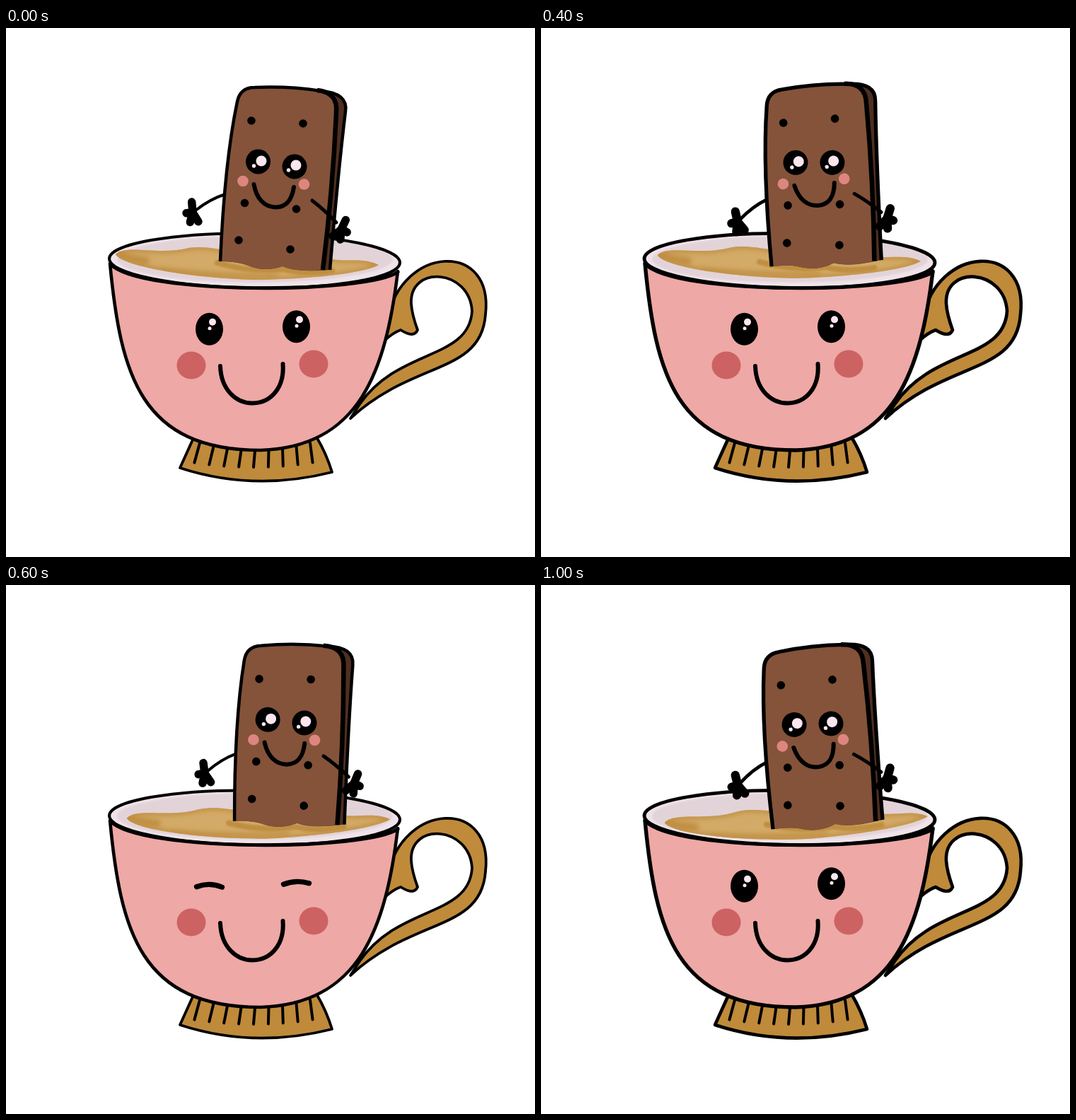
Write an HTML page with a canvas that moves like this. It is 748 px wide and 748 px high and loops after 1200 ms.

```html
<!DOCTYPE html>
<html lang="en">
<head>
<meta charset="utf-8">
<title>Biscuit in a teacup</title>
<style>
  html, body { margin: 0; width: 100%; height: 100%; overflow: hidden; background: #fff; }
  canvas { display: block; width: 748px; height: 748px; }
</style>
</head>
<body>
<canvas id="stage" width="748" height="748"></canvas>
<script>
const ctx = document.getElementById('stage').getContext('2d');
const INK = '#000', GOLD = '#bf8a3a', SHINE = '#fbe6ee', COFFEE = '#d3aa67', BREW = '#bf8e42';
const STEP = 200, RAD = Math.PI / 180;

const body = new Path2D('M147 333C162 490 190 597 360 597C500 593 537 485 554 344');
const handle = new Path2D(
  'M540 410C560 308 690 300 678 405C672 490 575 470 487 552' +
  'L500 532C555 452 655 470 659 400C655 340 570 335 573 390' +
  'Q574 405 582 427Q577 439 558 427Q547 431 535 442Z');
const foot = new Path2D('M265 580L246 622Q350 656 461 628Q453 602 440 580Z');
const rim = new Path2D();
rim.ellipse(351.5, 329, 205.5, 38.5, 0.8 * RAD, 0, 2 * Math.PI);
const liquid = new Path2D(
  'M155 320C170 305 215 322 258 311C300 305 320 326 440 322' +
  'C480 335 500 322 527 335C500 350 400 356 350 356C270 354 165 338 155 320Z');

const LEFT = 'M303 330Q309 190 327 104Q331 84 352 84Q400 82 ';
const OUTER = LEFT + '445 89Q484 92 480 118Q470 200 458 342';
const RIDGE = '440 88Q470 91 467 120Q462 230 448 342';
const WAVE = 'Q412 346 391 337Q365 346 340 335Q325 330 303 330Z';
const slab = new Path2D(OUTER + WAVE);
const slabFront = new Path2D(LEFT + RIDGE + WAVE);
const slabEdge = new Path2D(OUTER);
const ridge = new Path2D('M' + RIDGE);

function fill(path, color) {
  ctx.fillStyle = color;
  ctx.fill(path);
}
function stroke(path, width, color = INK) {
  ctx.strokeStyle = color;
  ctx.lineWidth = width;
  ctx.stroke(path);
}
function oval(x, y, rx, ry = rx, color = INK) {
  ctx.beginPath();
  ctx.ellipse(x, y, rx, ry, 0, 0, Math.PI * 2);
  ctx.fillStyle = color;
  ctx.fill();
}
const dot = (x, y, r, color) => oval(x, y, r, r, color);
const svg = (d, width, color) => stroke(new Path2D(d), width, color);

// Turn the drawing by some degrees about a pivot that lands at (x, y).
function place(px, py, x, y, deg) {
  ctx.translate(x, y);
  ctx.rotate(deg * RAD);
  ctx.translate(-px, -py);
}

function drawLiquid([dx, dy, deg]) {
  ctx.save();
  ctx.clip(rim);
  ctx.filter = 'blur(1px)';
  oval(352, 327, 195, 33, '#e2d3d9');
  ctx.filter = 'none';
  place(341, 330, 341 + dx, 330 + dy, deg);
  fill(liquid, COFFEE);
  ctx.clip(liquid);
  ctx.filter = 'blur(3px)';
  stroke(liquid, 6, BREW);
  svg('M157 319Q175 327 197 329', 11, BREW);
  svg('M220 342Q305 351 382 350', 5, BREW);
  ctx.filter = 'blur(1px)';
  svg('M299 332Q345 346 392 341Q425 349 461 343', 8, BREW);
  ctx.restore();
}

function drawCup(extra, blink, tide) {
  fill(handle, GOLD);
  stroke(handle, 3.8 + extra);
  fill(foot, GOLD);
  stroke(foot, 3.8 + extra);
  for (let i = -4; i <= 4; i++) {
    const x = 352 + 19.5 * i;
    svg(`M${x} ${598 - 0.7 * i * i}L${x + 1.4 * i - 2} ${621 - 0.4 * i * i}`, 4);
  }
  fill(body, '#eea8a6');
  fill(rim, '#efe3e9');
  drawLiquid(tide);
  stroke(body, 4.6 + extra);
  stroke(rim, 4 + extra);
  svg('M148 334C190 378 510 376 554 345', 5);

  for (const side of [-1, 1]) {
    const x = 349 + 61.5 * side, y = 424 - 1.75 * side;
    oval(348.5 + 86.5 * side, 476 - side, 20.5, 19.5, '#cd6262');
    if (blink) {
      svg(`M${x - 18} ${y + 1}Q${x} ${y - 6} ${x + 18} ${y + 0.5 - side}`, 7.3);
    } else {
      oval(x, y, 19.5, 23);
      dot(x + 4.5, y - 10, 5, SHINE);
      dot(x + 0.5, y - 1, 2.5, SHINE);
    }
  }
  svg('M303 478C304 511 325 531 349 530.5C375 530 394 508 391.5 475', 6);
}

function drawEye(x, y, dx, dy) {
  dot(x, y, 17.5);
  dot(x + dx, y + dy, 7.5, SHINE);
  dot(x + dx - 10.5, y + dy + 7, 2.7, SHINE);
}

// A mitten: four stubby fingers spread around the palm.
function drawHand(x, y, flip, tilt, extra) {
  ctx.save();
  ctx.translate(x, y);
  ctx.rotate(tilt * RAD);
  ctx.scale(flip, 1);
  for (const [deg, reach] of [[-95, 15], [175, 9], [105, 14], [58, 15]])
    svg(`M0 0L${reach * Math.cos(deg * RAD)} ${reach * Math.sin(deg * RAD)}`, 11.5 + extra);
  ctx.restore();
}

function drawBiscuit(extra, wink, [x, y, deg]) {
  ctx.save();
  place(374.3, 230.3, x, y, deg);
  svg('M310 235Q288 242 268 258', 4 + extra);
  drawHand(264, 261, 1, 0, extra);

  fill(slab, '#4f2f20');
  fill(slabFront, '#84533a');
  ctx.lineCap = 'butt';
  stroke(ridge, 6.5);
  stroke(slabEdge, 4.5 + extra);
  ctx.lineCap = 'round';

  [[347, 131], [337.5, 247.5], [329, 300]].forEach(([px, py], row) => {
    dot(px, py, 5.8);
    dot(px + 73, py + 4 + 4.5 * row, 5.8);
  });
  dot(335, 216.5, 7.8, '#dd8680');
  dot(421.5, 221, 7.8, '#dd8680');
  svg('M350.5 221C354 241 365 253 381 253.5C396 253.5 404 244 407 225', 6);
  if (wink) svg('M341 187Q355 180 368.5 189.5', 7);
  else drawEye(356.5, 189, 4.5, -1);
  drawEye(408, 196, 2, -2);

  svg('M433 244Q450 257 467 275', 5);
  drawHand(474, 285, -1, 20, extra);
  ctx.restore();
}

// slab: centre and tilt; tide: shift and tilt of the coffee.
const POSES = {
  right: { slab: [374.3, 230.3, 0], tide: [0, 0, 0] },
  left: { slab: [382.3, 235.3, -9.3], tide: [20, 4, -3.7] },
  high: { slab: [383.2, 228.8, -7.8], tide: [10, -2, -1] },
  mid: { slab: [389.8, 230.8, -2.6], tide: [16, 3, -2.1] }
};
const SEQUENCE = [
  { pose: 'right' },
  { pose: 'left' },
  { pose: 'high', bold: true },
  { pose: 'mid', blink: true },
  { pose: 'right', wink: true },
  { pose: 'left', bold: true }
];

function draw(now) {
  const beat = SEQUENCE[Math.floor(now / STEP) % SEQUENCE.length];
  const pose = POSES[beat.pose], extra = beat.bold ? 0.8 : 0;
  ctx.fillStyle = '#fff';
  ctx.fillRect(0, 0, 748, 748);
  ctx.lineCap = ctx.lineJoin = 'round';
  drawCup(extra, beat.blink, pose.tide);
  drawBiscuit(extra, beat.wink, pose.slab);
}

const start = performance.now();
function tick() {
  draw(performance.now() - start);
  requestAnimationFrame(tick);
}
tick();
</script>
</body>
</html>
```
